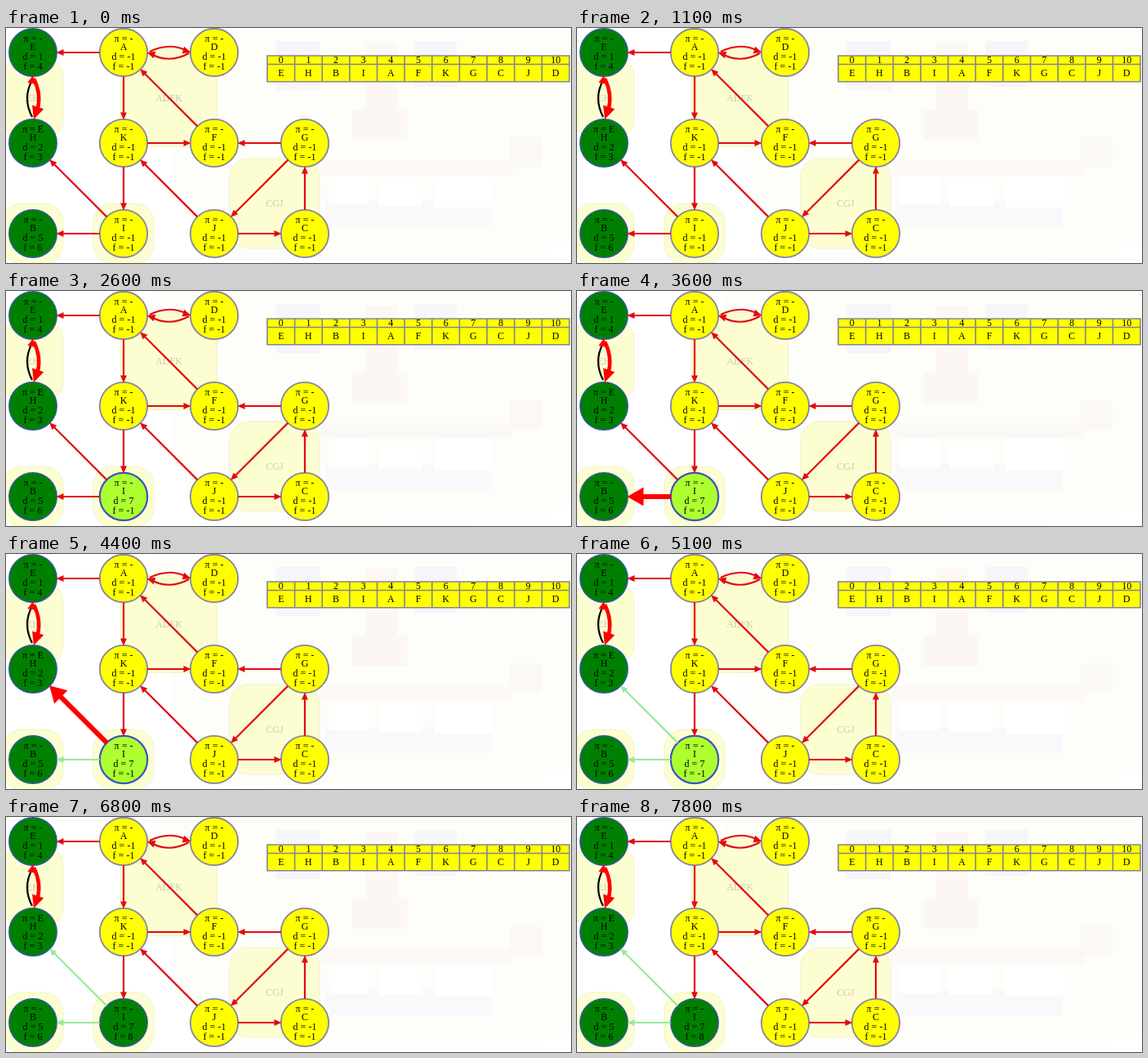
Animation of 692 by 288 pixels, one loop 7900 ms. Source, as an HTML page with a canvas:

```html
<!DOCTYPE html>
<html lang="en">
<head>
<meta charset="utf-8">
<title>Depth-first search</title>
<style>
html, body { margin: 0; width: 100%; height: 100%; overflow: hidden; background: #fff; }
canvas { display: block; }
</style>
</head>
<body>
<canvas id="stage" width="692" height="288"></canvas>
<script>
const ctx = document.getElementById('stage').getContext('2d');
const LOOP = 7900;
const STEP = 111, RADIUS = 29.2, TIP = 28.5;
const RED = '#e20a12', BRIGHT = '#ff0000', PALE = '#98ea98', DONE = '#008000', ACTIVE = '#adff2f';
const FONT = '12px "Liberation Serif", "Times New Roman", serif';

// Times at which the visit to node I advances
const DISCOVER = 1900, TRY_B = 3000, TRY_H = 4000, BOTH = 4700, FINISH = 5500;

const nodes = {};
['EAD', 'HKFG', 'BIJC'].forEach((row, r) =>
  [...row].forEach((name, c) => { nodes[name] = { x: 33 + c * STEP, y: 30 + r * STEP }; }));

const edges = ['AE', 'AK', 'KF', 'FA', 'KI', 'JK', 'JC', 'CG', 'GF', 'GJ'];
const groups = [['EH', 37, 50], ['ADFK', 59, 60], ['CGJ', 55, 55], ['B', 37, 37], ['I', 37, 37]];

function rect(color, x, y, w, h) {
  ctx.fillStyle = color;
  ctx.fillRect(x, y, w, h);
}

function label(text, x, y, color = '#000') {
  ctx.font = FONT;
  ctx.textAlign = 'center';
  ctx.fillStyle = color;
  ctx.fillText(text, x, y);
}

function backdrop() {
  rect('#fff', 0, 0, 692, 288);
  ctx.fillStyle = '#fdfdfa';
  ctx.beginPath();
  ctx.moveTo(178, 0);
  ctx.lineTo(692, 0);
  ctx.lineTo(692, 262);
  ctx.lineTo(640, 280);
  ctx.lineTo(255, 284);
  ctx.lineTo(222, 240);
  ctx.lineTo(204, 190);
  ctx.lineTo(200, 100);
  ctx.fill();
  rect('#f6f6fa', 330, 16, 55, 60);
  rect('#f6f6fa', 500, 16, 52, 56);
  rect('#fcf7f5', 440, 18, 39, 82);
  rect('#fcf7f5', 424, 100, 68, 37);
  rect('#fcf8f5', 385, 162, 236, 18);
  rect('#fcf8f5', 617, 134, 39, 36);
  rect('#f9f9fb', 390, 212, 205, 32);
  rect('#fff', 396, 182, 48, 34);
  rect('#fff', 456, 184, 54, 34);
  rect('#fff', 525, 182, 72, 38);
}

function drawGroup([names, w, h]) {
  const list = [...names].map(n => nodes[n]);
  const mean = k => list.reduce((sum, n) => sum + n[k], 0) / list.length;
  const x = mean('x'), y = mean('y');
  ctx.beginPath();
  ctx.roundRect(x - w, y - h, w * 2, h * 2, 23);
  ctx.fillStyle = '#fdfdd2';
  ctx.fill();
  ctx.strokeStyle = '#f3f1d0';
  ctx.lineWidth = 1;
  ctx.stroke();
  if (list.length > 1) label(names, x, y + 4, '#c9c9b8');
}

function head(x, y, angle, len, half, color) {
  ctx.save();
  ctx.translate(x, y);
  ctx.rotate(angle);
  ctx.beginPath();
  ctx.moveTo(0, 0);
  ctx.lineTo(-len, -half);
  ctx.lineTo(-len, half);
  ctx.closePath();
  ctx.fillStyle = color;
  ctx.fill();
  ctx.restore();
}

function arrow(pair, color = RED, thick = false) {
  const a = nodes[pair[0]], b = nodes[pair[1]];
  const angle = Math.atan2(b.y - a.y, b.x - a.x);
  const ux = Math.cos(angle), uy = Math.sin(angle);
  const len = thick ? 20 : 9;
  const tipX = b.x - ux * TIP, tipY = b.y - uy * TIP;
  ctx.beginPath();
  ctx.moveTo(a.x + ux * RADIUS, a.y + uy * RADIUS);
  ctx.lineTo(tipX - ux * (len - 1), tipY - uy * (len - 1));
  ctx.strokeStyle = color;
  ctx.lineWidth = thick ? 6 : 2.2;
  ctx.stroke();
  head(tipX, tipY, angle, len, thick ? 11.5 : 4, color);
}

// The branch from I turns bold while tried, then pale
function branch(pair, t, from, to) {
  const trying = t >= from && t < to;
  arrow(pair, t >= to ? PALE : trying ? BRIGHT : RED, trying);
}

function arc(x1, y1, cx, cy, x2, y2, color, width) {
  ctx.beginPath();
  ctx.moveTo(x1, y1);
  ctx.quadraticCurveTo(cx, cy, x2, y2);
  ctx.strokeStyle = color;
  ctx.lineWidth = width;
  ctx.stroke();
}

function curvedEdges() {
  arc(176, 29, 200, 17, 222, 28, RED, 2.2);
  arc(224, 31, 200, 44, 178, 32, RED, 2.2);
  head(226.5, 30, 0.3, 10, 4.5, RED);
  head(172.5, 30, Math.PI + 0.3, 10, 4.5, RED);

  arc(32, 109, 20, 86, 32, 64, '#000', 2.2);
  arc(34, 62, 44, 82, 38, 102, BRIGHT, 4.5);
  head(33, 58, -1.4, 10, 5, BRIGHT);
  head(34, 112, 1.9, 16, 7.5, BRIGHT);
}

function drawNode(name, t) {
  const { x, y } = nodes[name];
  let fill = '#ff0', line = '#8585a2', d = -1, f = -1, width = 1.8;
  if (name === 'E') [d, f] = [1, 4];
  if (name === 'H') [d, f] = [2, 3];
  if (name === 'B') [d, f] = [5, 6];
  if (name === 'I' && t >= DISCOVER) {
    d = 7;
    fill = ACTIVE;
    line = '#3d55bd';
    width = 2.2;
    if (t >= FINISH) f = 8;
  }
  if (f > 0) {
    fill = DONE;
    line = '#30589a';
    width = 1.5;
  }
  ctx.beginPath();
  ctx.arc(x, y, RADIUS, 0, Math.PI * 2);
  ctx.fillStyle = fill;
  ctx.fill();
  ctx.strokeStyle = line;
  ctx.lineWidth = width;
  ctx.stroke();
  label(name === 'H' ? 'π = E' : 'π = -', x, y - 13);
  label(name, x, y - 3);
  label('d = ' + d, x, y + 9);
  label('f = ' + f, x, y + 21);
}

function drawTable() {
  const left = 320, width = 370, cell = width / 11;
  rect('#ff0', left, 34, width, 32);
  ctx.beginPath();
  for (const y of [34, 44.5, 65.7]) {
    ctx.moveTo(left - 0.8, y);
    ctx.lineTo(left + width + 0.8, y);
  }
  for (let i = 0; i <= 11; i++) {
    ctx.moveTo(left + i * cell, 34);
    ctx.lineTo(left + i * cell, 66);
  }
  ctx.strokeStyle = '#85858c';
  ctx.lineWidth = 1.6;
  ctx.stroke();
  [...'EHBIAFKGCJD'].forEach((name, i) => {
    const x = left + (i + 0.5) * cell;
    label(i, x, 43);
    label(name, x, 59);
  });
}

function draw(t) {
  backdrop();
  groups.forEach(drawGroup);
  Object.keys(nodes).forEach(name => drawNode(name, t));
  edges.forEach(e => arrow(e));
  branch('IB', t, TRY_B, TRY_H);
  branch('IH', t, TRY_H, BOTH);
  curvedEdges();
  drawTable();
}

const start = performance.now();
function tick() {
  draw((performance.now() - start) % LOOP);
  requestAnimationFrame(tick);
}
tick();
</script>
</body>
</html>
```
